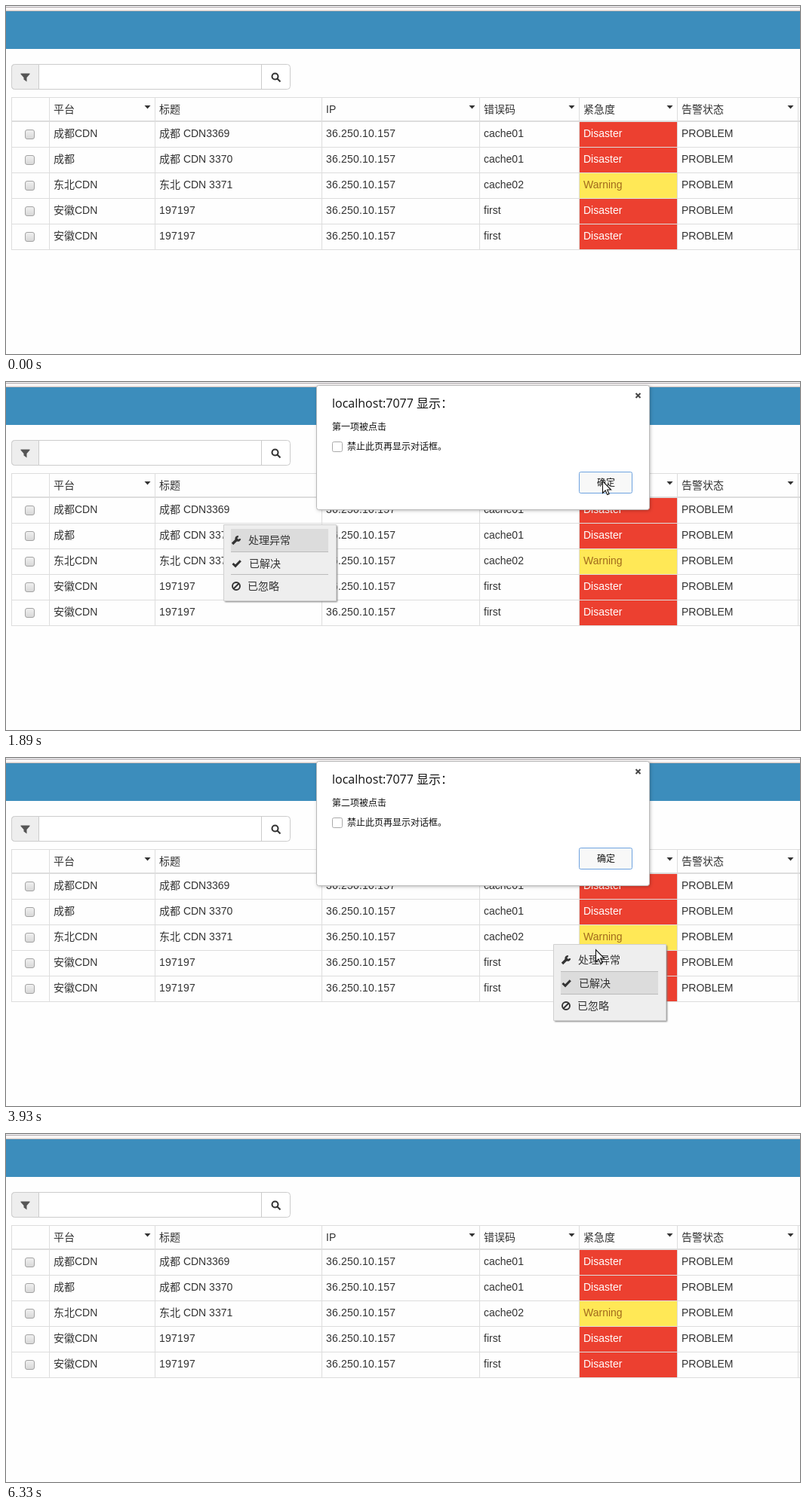
Animation of 1052 by 462 pixels, one loop 6.6 s. Source, as an HTML page with a canvas:

```html
<!DOCTYPE html>
<html lang="zh-CN">
<head>
<meta charset="utf-8">
<title>Alarm table</title>
<style>
html, body { margin: 0; width: 100%; height: 100%; overflow: hidden; background: #fefefe; }
canvas { display: block; }
</style>
</head>
<body>
<canvas id="stage" width="1052" height="462"></canvas>
<script>
const LOOP = 6600, STEP = 30, ROW = 34, ITEM = 30.5;
const ctx = document.getElementById('stage').getContext('2d');
const CJK = '"Noto Sans CJK SC", "Noto Sans CJK", sans-serif';
const PAGE_FONT = '14px "Liberation Sans", ' + CJK;
const TITLE_FONT = '16px "Open Sans", ' + CJK;
const SMALL_FONT = '12px "Open Sans", ' + CJK;

const columns = [
  { x: 7, name: '' },
  { x: 57, name: '平台', sortable: true },
  { x: 197, name: '标题' },
  { x: 418, name: 'IP', sortable: true },
  { x: 627, name: '错误码', sortable: true },
  { x: 759, name: '紧急度', sortable: true },
  { x: 889, name: '告警状态', sortable: true },
  { x: 1049, name: '' },
];
const rows = [
  ['成都CDN', '成都 CDN3369', 'cache01', 'Disaster'],
  ['成都', '成都 CDN 3370', 'cache01', 'Disaster'],
  ['东北CDN', '东北 CDN 3371', 'cache02', 'Warning'],
  ['安徽CDN', '197197', 'first', 'Disaster'],
  ['安徽CDN', '197197', 'first', 'Disaster'],
];
const levels = {
  Disaster: { back: '#ec4030', ink: '#fff' },
  Warning: { back: '#ffe856', ink: '#a0691c' },
};

// The pointer rests between moves; each move eases out to x, y
const entry = { x: 1040, y: 39 };
const moves = [
  { from: 90, to: 660, x: 288, y: 189 },
  { from: 780, to: 960, x: 353, y: 203 },
  { from: 1380, to: 1860, x: 790, y: 131 },
  { from: 1920, to: 2280, x: 704, y: 204 },
  { from: 2490, to: 2700, x: 725, y: 247 },
  { from: 3090, to: 3450, x: 775, y: 305 },
  { from: 3870, to: 4230, x: 795, y: 139 },
  { from: 4560, to: 4980, x: 361, y: 145 },
  { from: 5220, to: 5280, x: 401, y: 158 },
  { from: 5400, to: 5640, x: 606, y: 160 },
  { from: 5850, to: 6180, x: 1005, y: 122 },
  { from: 6180, to: 6330, x: 1056, y: 63 },
];
const menus = [
  { from: 720, to: 2820, x: 288, y: 189 },
  { from: 2820, to: 5040, x: 725, y: 247 },
  { from: 5040, to: 5430, x: 361, y: 145 },
];
const dialogs = [
  { from: 1215, to: 1890, text: '第一项被点击' },
  { from: 3735, to: 4470, text: '第二项被点击' },
];

const arrowShape = new Path2D('M.5 .5V16.5L4.2 13L6.7 18.6L9.1 17.6L6.7 12H11.6Z');
const handShape = new Path2D('M-1.5 13V1.7Q-1.5 .5 0 .5Q1.5 .5 1.5 1.7V7Q4.5 5.8 4.8 8Q7.3 6.8 7.8 9Q10.5 8 10.5 11V15Q10.5 17.5 8.8 19V21.5H-.5V19.5L-5 13.5Q-6.2 11.3-4.5 10.7Q-3.4 10.4-1.5 13Z');
const handLines = new Path2D('M1.5 7V11M4.8 8V11.5M7.8 9V12');
const funnel = new Path2D('M-6-5H6V-4L2 .5V6L-2 3V.5L-6-4Z');

const clamp = v => Math.max(0, Math.min(1, v));
const easeOut = p => p * (2 - p);
const active = (list, t, linger = 0) => list.find(e => t >= e.from && t < e.to + linger);

function pointerAt(t) {
  return moves.reduce(({ x, y }, m) => {
    const p = easeOut(clamp((t - m.from) / (m.to - m.from)));
    return { x: x + (m.x - x) * p, y: y + (m.y - y) * p };
  }, entry);
}

// A dialog freezes the hover state of the page below it
function hoveredItem(menu, t) {
  const dialog = active(dialogs, t, 90);
  const { x, y } = pointerAt(dialog ? dialog.from : t);
  const inside = x >= menu.x + 10 && x < menu.x + 139;
  const item = Math.floor((y - menu.y - 6) / ITEM);
  return inside && item >= 0 && item < 3 ? item : -1;
}

function rect(x, y, w, h, color) {
  ctx.fillStyle = color;
  ctx.fillRect(x, y, w, h);
}

function box(x, y, w, h, radius, fill, stroke) {
  ctx.beginPath();
  ctx.roundRect(x, y, w, h, radius);
  ctx.fillStyle = fill;
  ctx.fill();
  ctx.shadowColor = 'transparent';
  ctx.strokeStyle = stroke;
  ctx.lineWidth = 1;
  ctx.stroke();
}

function shadow(color, blur, offset) {
  ctx.shadowColor = color;
  ctx.shadowBlur = blur;
  ctx.shadowOffsetX = ctx.shadowOffsetY = offset;
}

function text(str, x, y, color = '#333', font = PAGE_FONT) {
  ctx.font = font;
  ctx.fillStyle = color;
  ctx.letterSpacing = /^[\d.]+$/.test(str) ? '0.2px' : '0px';
  ctx.fillText(str, x, y);
}

function lines(d, x, y, width, color = '#333') {
  ctx.save();
  ctx.translate(x, y);
  ctx.strokeStyle = color;
  ctx.lineWidth = width;
  ctx.stroke(new Path2D(d));
  ctx.restore();
}

function drawSearch() {
  box(7.5, 77.5, 369, 33, 4, '#fff', '#ccc');
  box(7.5, 77.5, 36, 33, [4, 0, 0, 4], '#eee', '#ccc');
  rect(338, 78, 1, 32, '#ccc');
  ctx.save();
  ctx.translate(25.5, 94.5);
  ctx.fillStyle = '#555';
  ctx.fill(funnel);
  ctx.restore();
  lines('M3-1A4 4 0 1 1-5-1A4 4 0 1 1 3-1M2 2L6 6', 357.5, 94.5, 2.1);
}

function drawCheckbox(y) {
  const shade = ctx.createLinearGradient(0, y, 0, y + 12);
  shade.addColorStop(0, '#f2f2f2');
  shade.addColorStop(1, '#d8d8d8');
  box(25.5, y + .5, 12, 12, 2.5, shade, '#a3a3a3');
}

function drawCaret(x) {
  ctx.fillStyle = '#333';
  ctx.beginPath();
  ctx.moveTo(x - 4, 132);
  ctx.lineTo(x + 4, 132);
  ctx.lineTo(x, 136.5);
  ctx.fill();
}

function drawTable() {
  rows.forEach((row, i) => rect(760, 154 + i * ROW, 129, ROW, levels[row[3]].back));
  for (const { x } of columns) rect(x, 121, 1, 203, '#ddd');
  rect(7, 121, 1045, 1, '#ddd');
  rect(7, 152, 1045, 2, '#ddd');
  columns.forEach(({ x, name, sortable }, i) => {
    text(name, x + 6, 142);
    if (sortable) drawCaret(columns[i + 1].x - 9.5);
  });
  rows.forEach(([place, title, code, level], i) => {
    const base = 174 + i * ROW;
    rect(7, base + 13, 1045, 1, '#ddd');
    drawCheckbox(base - 10);
    ['', place, title, '36.250.10.157', code, level, 'PROBLEM'].forEach((cell, c) =>
      text(cell, columns[c].x + 6, base, cell === level ? levels[level].ink : '#333'));
  });
}

function drawPage() {
  rect(0, 0, 1052, 462, '#fefefe');
  rect(0, 1, 1052, 1, '#aaa5aa');
  rect(0, 2, 1052, 4, '#f6f3f3');
  rect(0, 6, 1052, 1, '#c6bbb8');
  rect(0, 7, 1052, 50, '#3c8dbc');
  drawSearch();
  drawTable();
}

function drawMenu(menu, t) {
  const item = hoveredItem(menu, t);
  ctx.save();
  ctx.translate(menu.x, menu.y);
  shadow('#808080', 2, 1.5);
  box(.5, .5, 149, 101, 0, '#eee', '#d0d0d0');
  if (item >= 0) rect(10, 6 + item * ITEM, 129, ITEM, '#dcdcdc');
  rect(10, 36, 129, 1, '#bbb');
  rect(10, 66, 129, 1, '#bbb');
  lines('M-5 5L2-2', 17, 21, 3.4);
  lines('M2.8-4.8A2.7 2.7 0 1 0 5-1.9', 17, 21, 2.5);
  lines('M-5 0L-1.5 3.4L5.3-3.7', 17.5, 52, 3);
  lines('M5 0A5 5 0 1 1-5 0A5 5 0 1 1 5 0M-3.5 3.5L3.5-3.5', 17, 82, 1.9);
  text('处理异常', 33, 26);
  text('已解决', 34, 57);
  text('已忽略', 32, 87);
  ctx.restore();
}

function drawDialog(d, t) {
  const shown = clamp((t - d.from) / 165) * clamp(1 - (t - d.to) / 60);
  if (!shown) return;
  const scale = .94 + .06 * shown;
  ctx.save();
  ctx.globalAlpha = shown;
  ctx.translate(632, 87.5);
  ctx.scale(scale, scale);
  ctx.translate(-632, -87.5);
  shadow('rgba(0,0,0,.3)', 4, 1);
  box(411.5, 4.5, 441, 165, 3, '#fff', '#bbb');
  text('localhost:7077 显示：', 432, 33.5, '#111', TITLE_FONT);
  text(d.text, 432, 63.5, '#111', SMALL_FONT);
  box(432.5, 79.5, 13, 13, 2, '#fff', '#aaa');
  text('禁止此页再显示对话框。', 452, 90, '#111', SMALL_FONT);
  box(759.5, 119.5, 70, 28, 2, '#f8f8f8', '#6ea3e0');
  text('确定', 783, 138, '#111', SMALL_FONT);
  lines('M-3-3L3 3M3-3L-3 3', 837.5, 18, 2, '#444');
  ctx.restore();
}

function drawPointer(t) {
  if (t < moves[0].from || t >= moves.at(-1).to) return;
  const { x, y } = pointerAt(t);
  // The pointer shape follows what lay under it a moment ago
  const before = t - 60, beforeY = pointerAt(before).y;
  const hand = beforeY > 122 && beforeY < 153 && !active(dialogs, before);
  const shape = hand ? handShape : arrowShape;
  ctx.save();
  ctx.translate(Math.round(x), Math.round(y));
  ctx.fillStyle = '#fff';
  ctx.strokeStyle = '#111';
  ctx.lineWidth = 1.1;
  ctx.fill(shape);
  ctx.stroke(shape);
  if (hand) ctx.stroke(handLines);
  ctx.restore();
}

function frame() {
  const t = Math.floor(performance.now() % LOOP / STEP) * STEP;
  const menu = active(menus, t);
  drawPage();
  if (menu) drawMenu(menu, t);
  for (const dialog of dialogs) drawDialog(dialog, t);
  drawPointer(t);
  requestAnimationFrame(frame);
}
frame();
</script>
</body>
</html>
```
